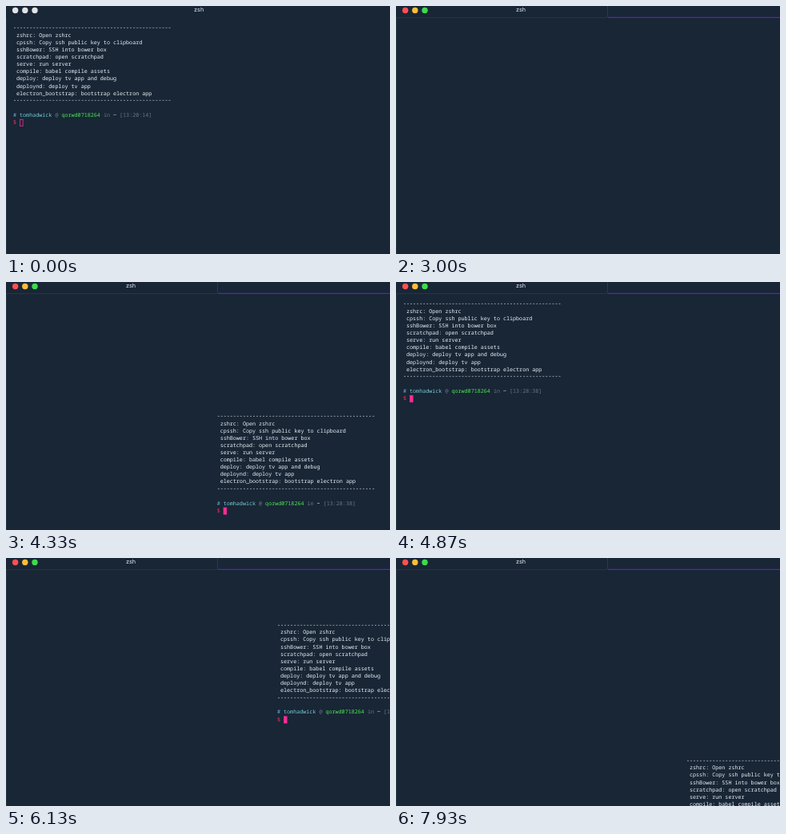
Animation of 480 by 311 pixels, one loop 8000 ms. Source, as an HTML page:

```html
<!DOCTYPE html>
<html lang="en">
<head>
<meta charset="utf-8">
<title>zsh</title>
<style>
html, body { margin: 0; width: 100%; height: 100%; overflow: hidden; background: #182636; }
svg { display: block; width: 100vw; height: 100vh; }
text { white-space: pre; text-rendering: geometricPrecision; }
.mono { font: 500 6.72px "Noto Sans Mono", "DejaVu Sans Mono", monospace; fill: #eef2f5; }
.title { font: 7.3px Inter, Roboto, sans-serif; fill: #e9edf0; text-anchor: middle; }
.user { fill: #76ccd4; }
.host { fill: #4de84f; }
.dim { fill: #6a7884; }
.hash { fill: #6fb2de; }
.dollar { fill: #ff2f55; }
</style>
</head>
<body>
<svg viewBox="0 0 480 311" preserveAspectRatio="none">
  <rect width="480" height="311" fill="#182636"/>
  <rect y="15" width="1" height="296" fill="#263544"/>
  <g id="screen"></g>
  <g id="tabs">
    <rect y="14" width="264" height="1" fill="#263646"/>
    <rect x="264" width="1" height="14" fill="#2b3a4a"/>
    <rect x="265" y="13.8" width="215" height="1.2" fill="#6f16d2"/>
  </g>
  <g id="lights"></g>
  <text id="title" class="title" y="7.4">zsh</text>
</svg>
<script>
const LOOP = 8000, STEP = 200 / 3;
const FOCUS = 870, NEW_TAB = 2470, PROMPT = 3860;
const ROW = 9.1, CELL = 4.032, LEFT = 9, BASE = 29.7;
const PINK = '#f62e93';
const LIGHTS = ['#ff5052', '#ffbd3a', '#3ddc4c'];

const $ = id => document.getElementById(id);
const add = (parent, tag, attrs, text = '') => {
  const el = document.createElementNS('http://www.w3.org/2000/svg', tag);
  for (const k in attrs) el.setAttribute(k, attrs[k]);
  el.textContent = text;
  return parent.appendChild(el);
};

const rule = '-'.repeat(49);
const lines = [
  rule,
  ' zshrc: Open zshrc',
  ' cpssh: Copy ssh public key to clipboard',
  ' sshBower: SSH into bower box',
  ' scratchpad: open scratchpad',
  ' serve: run server',
  ' compile: babel compile assets',
  ' deploy: deploy tv app and debug',
  ' deploynd: deploy tv app',
  ' electron_bootstrap: bootstrap electron app',
  rule
];
const screen = $('screen');
const put = (row, col, text, cls = '', dy = 0) =>
  add(screen, 'text', { x: LEFT + col * CELL, y: BASE + row * ROW + dy, class: 'mono ' + cls }, text);

lines.forEach((s, i) => s === rule ? put(i, 0, s, '', -0.5) : put(i, 1, s.trim()));
put(12, 0, '#', 'hash');
put(12, 2, 'tomhadwick', 'user');
put(12, 13, '@', 'dim');
put(12, 15, 'qorwd0718264', 'host');
put(12, 28, 'in', 'dim');
put(12, 31, '~');
const clock = put(12, 33, '', 'dim');
put(13, 0, '$', 'dollar');
const cursor = add(screen, 'rect', { stroke: PINK, 'stroke-width': 0.8, x: 17.4, y: 142.3, width: 3.7, height: 8.2 });
const lights = LIGHTS.map((c, i) => add($('lights'), 'circle', { cx: 11.6 + i * 12.2, cy: 5.5, r: 3.7 }));

// Waypoints of the wandering screen: time, x, y
const path = [
  [4000, 0, 0], [4400, 275, 152], [4800, 0, 0], [4933, 0, 0],
  [5500, 360, 232], [6133, 330, 56.5], [6600, 0, 0],
  [7133, 0, 0], [7933, 354, 226.5]
];

function offset(t) {
  const i = path.findIndex(p => p[0] > t);
  if (i === 0) return [0, 0];
  if (i < 0) return path[path.length - 1].slice(1);
  const a = path[i - 1], b = path[i];
  const u = (t - a[0]) / (b[0] - a[0]), e = u * u * (3 - 2 * u);
  return [a[1] + (b[1] - a[1]) * e, a[2] + (b[2] - a[2]) * e];
}

function draw(t) {
  const focused = t >= FOCUS, tabbed = t >= NEW_TAB;
  lights.forEach((el, i) => el.setAttribute('fill', focused ? LIGHTS[i] : '#e2e3e4'));
  cursor.setAttribute('fill', focused ? PINK : 'none');
  $('tabs').setAttribute('visibility', tabbed ? 'visible' : 'hidden');
  $('title').setAttribute('x', tabbed ? 156 : 241.2);
  clock.textContent = tabbed ? '[13:28:38]' : '[13:20:14]';
  screen.setAttribute('visibility', tabbed && t < PROMPT ? 'hidden' : 'visible');
  const [x, y] = offset(Math.floor((t + 5) / STEP) * STEP);
  screen.setAttribute('transform', `translate(${x.toFixed(2)} ${y.toFixed(2)})`);
}

const start = performance.now();
function tick() {
  draw((performance.now() - start) % LOOP);
  requestAnimationFrame(tick);
}
tick();
</script>
</body>
</html>
```
